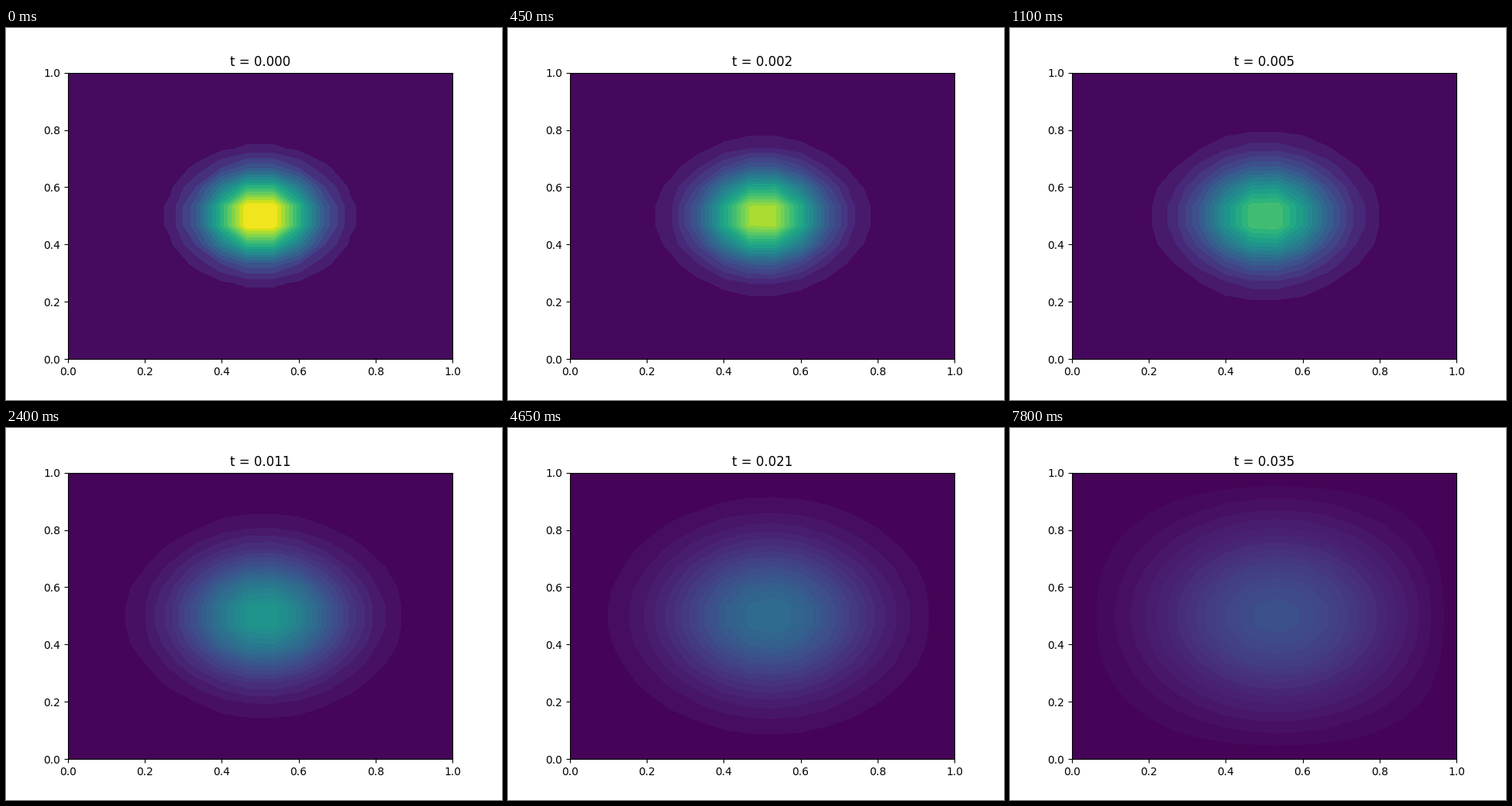
These frames come from a looping animation (640x480 px, 8000 ms). A matplotlib script:

```python
import numpy as np
import matplotlib.pyplot as plt
from matplotlib.animation import FuncAnimation

# Advection-diffusion of a Gaussian bump on a coarse unit square
N = 15
FRAMES = 160
INTERVAL = 50
D = 0.5
V = 1.0

h = 1 / N
dt = h**2 / 20
x = np.linspace(0, 1, N + 1)
X, Y = np.meshgrid(x, x)


def step(u):
    """One explicit step: upwind in x, central diffusion, fixed edges."""
    new = u.copy()
    c = u[1:-1, 1:-1]
    left, right = u[1:-1, :-2], u[1:-1, 2:]
    below, above = u[:-2, 1:-1], u[2:, 1:-1]
    diffusion = D * (left + right + below + above - 4 * c) / h**2
    advection = V * (c - left) / h
    new[1:-1, 1:-1] = c + dt * (diffusion - advection)
    return new


states = [np.exp(-50 * ((X - 0.5)**2 + (Y - 0.5)**2))]
for _ in range(FRAMES - 1):
    states.append(step(states[-1]))
peak = states[0].max()

fig, ax = plt.subplots(figsize=(6.4, 4.8), dpi=100)
ax.set_xlim(0, 1)
ax.set_ylim(0, 1)
title = ax.set_title("")
shown = []


def draw(i):
    while shown:
        shown.pop().remove()
    shown.append(ax.contourf(X, Y, states[i], 20, vmin=0, vmax=peak))
    title.set_text(f"t = {i * dt:.3f}")
    return shown + [title]


anim = FuncAnimation(fig, draw, frames=FRAMES, interval=INTERVAL,
                     repeat=True, repeat_delay=0, blit=False)
plt.show()
```
